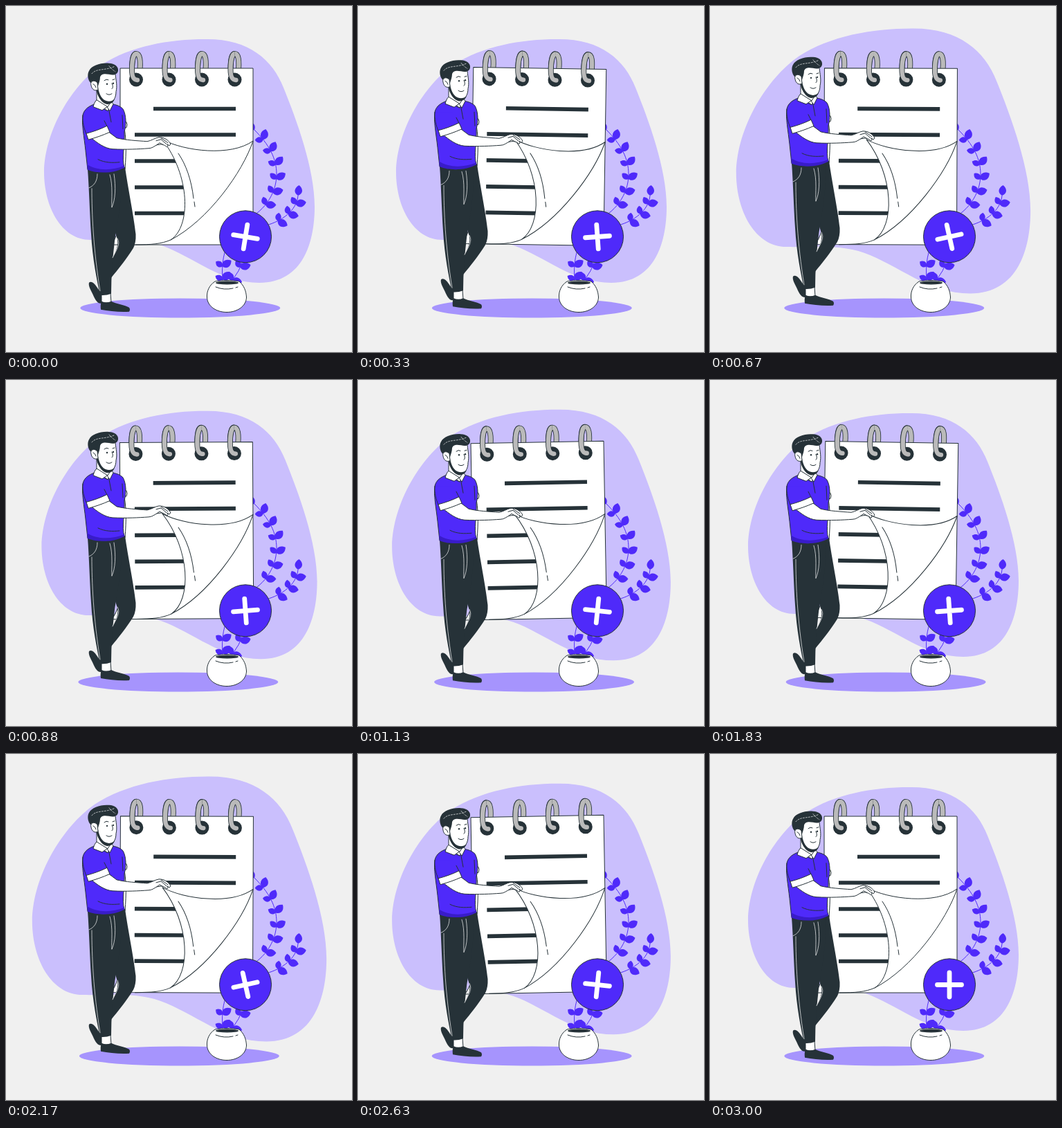
An HTML page for the animation above (3040 ms loop, 500 px wide and 500 px high).

```html
<!DOCTYPE html>
<html>
<head>
<meta charset="utf-8">
<style>
html, body { margin: 0; height: 100%; overflow: hidden; background: #f0f0f0; }
svg { display: block; width: 100vw; height: 100vh; }
.line { fill: none; stroke: #263238; stroke-linecap: round; stroke-linejoin: round; }
.paper { fill: #fff; stroke: #263238; stroke-linejoin: round; }
.dark { fill: #263238; }
.main { fill: #4f2afa; }
.outlined { stroke: #263238; stroke-linejoin: round; }
.stem { fill: none; stroke: #4f2afa; }
.seam { fill: none; stroke: #fff; stroke-width: .8; stroke-linecap: round; opacity: .85; }
.ring { fill: none; stroke: #263238; stroke-width: 8; }
.ring.metal { stroke: #bababa; stroke-width: 6.3; }
</style>
</head>
<body>
<svg viewBox="0 0 500 500">
  <path id="blob" fill="#cabffd" d="M288 48 C350 47 385 77 401 118 C420 165 446 235 446 290 C446 340 430 400 366 400 C310 400 270 362 225 346 C190 334 150 339 122 338 C80 338 55 290 55 240 C56 180 95 115 138 85 C180 58 235 48 288 48Z"/>
  <ellipse id="shadow" cx="251.800" cy="436.500" rx="144.500" ry="14" fill="#a694fd"/>
  <g id="plant"></g>

  <g id="pad">
    <g id="backRings"></g>
    <path class="paper" d="M165 90 H357 V345 H152 C160 335 165 318 165 298Z"/>
    <path class="line" stroke-width="5.700" style="stroke-linecap: butt" d="M213 148.500 H332 M186 186 H332 M186 224 H250 M186 262 H262 M186 299.500 H264"/>
    <path class="paper" d="M226 193 C258 210 325 218 357 195 C342 240 292 310 238 338 C268 318 266 245 226 193Z"/>
    <path class="line" d="M187 345 C210 345 224 344 238 338 M249 213 C260 229 268 251 271 278 M272 283 L273 290"/>
    <g id="frontRings"></g>
  </g>

  <g id="man">
    <!-- far arm -->
    <path class="paper" d="M170 172 C174 190 174 210 172 236 L167 236 V172Z"/>
    <path class="paper" d="M168 168 L174 168 Q176 172 174 176 L168 177Z"/>
    <!-- far leg -->
    <path class="dark" d="M120 400 C123 397 128 401 131 406 L138 416 L138 430 C131 431 128 422 124 414 C121 408 119 404 120 400Z"/>
    <path class="dark" d="M150 236 L172 233 C176 262 185 305 187.500 330 Q188 342 184 350 C174 366 162 381 152 393 L148 376 C156 360 163 350 161 338 L150 300Z"/>
    <!-- near leg -->
    <path class="paper" d="M138 415 L151 415 L152 429 L138 430Z"/>
    <path class="dark" d="M118 236 L168 234 C168 280 160 320 157 340 C154 365 152 390 152 416 Q144 419 136 418 C131 395 125 365 123 330 C121 300 120 262 118 236Z"/>
    <path class="dark" d="M138 427 Q145 430 152 427 C159 431 172 432 178 436 Q180 439 178 442 C164 443 149 441 137 439 Q136 432 138 427Z"/>
    <path class="seam" d="M132 243 C132 254 127 260 120 263 M124 264 C124 300 126 350 136 412 M150 244 C155 260 152 280 153 291 M156 243 C159 262 158 281 153 291 M161 336 C166 344 160 352 154 364"/>
    <!-- neck and shirt -->
    <path class="paper" d="M131 118 L131 141 L147 152 L153 140 L150 128Z"/>
    <path class="main outlined" d="M128 142 C120 145 113 149 111 158 C109 170 113 190 115 209 L118 237 C134 243 156 242 171 234 C167 220 172 200 171 182 C174 172 174 158 169 149 C164 144 158 143 154 142 L147 152Z"/>
    <path d="M117 229 C130 238 152 239 171 231 L171 234 C156 242 134 243 118 237Z" fill="#391cc9"/>
    <path class="line" d="M133 222 C143 227 154 227 164 226 M149 152 L152 168 M168 158 L169 178"/>
    <path class="paper" d="M131 136 C128 139 127 142 126 146 L139 151 L146 146 L150 152 L155 142 L152 138 L147 146Z"/>
    <!-- head -->
    <path class="paper" d="M132 100 C142 96 154 94 158 99 C159 108 161 116 159 124 C159 133 155 140 147 141 C138 140 133 131 131 122Z"/>
    <path class="dark" d="M132 113 C134 126 137 134 144 137 C149 139 153 138 157 135 C155 140 150 143 145 142 C138 140 133 132 131 122Z"/>
    <path class="dark" d="M123 112 C118 108 117 99 120 94 C124 86 137 82 149 83 C157 83 163 88 162 94 C161 99 156 101 149 99 C142 98 138 98 136 103 C136 108 134 112 133 116Z"/>
    <path class="paper" d="M132 111 C127 106 121 109 123 115 C124 121 129 124 133 121Z"/>
    <path class="seam" stroke-dasharray="2 2" d="M124 98 C131 90 142 94 156 88 M149 87 Q154 93 158 95"/>
    <path class="line" d="M126 113 Q129 114 130 118 M142 108 Q145 105 148 107 M154 107 L157 106 M153 112 Q156 118 153 120 M145 127 Q149 130 153 127"/>
    <circle class="dark" cx="146" cy="113" r="1.200"/>
    <circle class="dark" cx="155" cy="112" r="1.200"/>
    <!-- near arm -->
    <path class="paper" d="M122 190 C132 198 142 206 154 207 C174 208 192 207 206 206 C211 206 214 203 218 201 L225 200 C229 201 231 203 233 204 Q235 203 233 200 L236 202 Q239 201 237 198 C233 193 228 190 221 190 C215 191 210 195 204 196 C190 195 172 194 160 191 L148 182Z"/>
    <path class="line" d="M217 195 L224 193 L232 200 M224 191 L234 198 M218 201 L222 198 L227 201"/>
    <path class="main" d="M112 158 C110 168 113 178 116 185 L146 174 C143 168 139 162 137 158"/>
    <path class="line" d="M111 158 C110 168 113 178 116 185 M146 174 L142 166"/>
    <path class="paper" d="M116 184.500 C126 182 137 178 146 173.500 L150 182.500 C140 187 130 190.500 119 193.500Z"/>
  </g>

  <circle class="main outlined" cx="346" cy="333.300" r="37.500"/>
  <path id="plus" d="M328.500 333.500 H363.500 M346 316 V351" stroke="#fff" stroke-width="6.800" stroke-linecap="round"/>

  <path class="paper" d="M302 398 C293 404 290 413 290.500 421 C291 434 304 442.500 319 442.500 C334 442.500 347 434 347.500 421 C347 412 344 404 337 398 C326 396 312 396 302 398Z"/>
  <ellipse class="dark" cx="319.500" cy="400" rx="16.500" ry="2.500"/>
  <path class="line" d="M303 406 Q315 411 328 408 M332 407 L335 406"/>
</svg>
<script>
const $ = id => document.getElementById(id);
const place = (id, value) => $(id).setAttribute('transform', value);

function add(id, markup) {
  $(id).insertAdjacentHTML('beforeend', markup);
  return $(id).lastElementChild;
}

function leaf(x, y, turn, size) {
  add('plant', `<path class="main" d="M0 0C.2 -.47 .7 -.47 1 0C.7 .47 .2 .47 0 0Z"
    transform="translate(${x} ${y}) rotate(${turn}) scale(${size})"/>`);
}

// A stem with a leaf at its tip and pairs of leaves every `gap` below it
function branch(d, skip, gap, pairs) {
  const stem = add('plant', `<path class="stem" d="${d}"/>`);
  const length = stem.getTotalLength();
  const node = at => {
    const a = stem.getPointAtLength(at - 1), b = stem.getPointAtLength(at);
    return [b.x, b.y, Math.atan2(b.y - a.y, b.x - a.x) * 180 / Math.PI];
  };
  leaf(...node(length), 15);
  for (let i = 0; i < pairs; i++) {
    const [x, y, turn] = node(length - skip - i * gap);
    leaf(x, y, turn + 52, 15.5);
    leaf(x, y, turn - 55, 12);
  }
}

branch('M340 312 C372 300 391 272 391 243 C391 220 380 200 359 179', 19, 20.5, 6);
branch('M376 317 C398 311 420 296 422 274', 13, 18, 3);
branch('M314 400 C311 385 312 360 322 340', 38, 19, 2);
branch('M322 400 Q338 388 346 355', 24, 23, 2);

function ring(id, d) {
  add(id, `<path class="ring" d="${d}"/>`);
  add(id, `<path class="ring metal" d="${d}"/>`);
}

for (let i = 0; i < 4; i++) {
  const x = 188 + i * 47.5;
  ring('backRings', `M${x + 5} 97 Q${x + 8} 69 ${x} 69 Q${x - 6} 69 ${x - 6} 92`);
  add('frontRings', `<circle class="dark" cx="${x}" cy="106.5" r="10"/>`);
  ring('frontRings', `M${x} 69 C${x - 4} 69 ${x - 6} 80 ${x - 6} 92 C${x - 6} 102 ${x - 4} 107 ${x + 2} 107`);
  add('frontRings', `<circle fill="#bababa" cx="${x + 2}" cy="107" r="3.150"/>`);
}

// cubic-bezier(.25, .1, .25, 1)
function ease(x) {
  let lo = 0, hi = 1, s;
  for (let i = 0; i < 20; i++) {
    s = (lo + hi) / 2;
    if (.75 * s * (1 - s) + s ** 3 < x) lo = s; else hi = s;
  }
  return .3 * s * (1 - s) ** 2 + 3 * s * s * (1 - s) + s ** 3;
}

const phase = (t, length) => (t / length % 1 + 1) % 1;
const peak = (p, from, top, to) =>
  Math.max(0, Math.min((p - from) / (top - from), (to - p) / (to - top)));

// Each takes a phase from 0 to 1
const float = p => peak(p, 0, .5, 1);
const sway = p => peak(p, 0, .25, .5) - peak(p, .5, .75, 1);
const beat = p => peak(p, 0, .1, .3) + peak(p, .4, .5, .6);

// Ten eased moves that grow toward the middle and shrink again
function shake(p) {
  const reach = [0, -.75, 1.5, -3, 3, -3];
  const at = i => reach[Math.min(i, 10 - i)];
  const i = Math.floor(p * 10);
  return at(i) + (at(i + 1) - at(i)) * ease(p * 10 - i);
}

function draw(ms) {
  const step = Math.floor((ms % 3040 + 4) * .024);  // 24 steps a second
  const time = step / 24, t = time + .02;
  const scale = 1 + .1 * beat(phase(t - .5, 1.5));
  const turn = step < 72 ? 15 * sway(phase(t + .5, 1.5)) : 0;
  place('blob', `translate(250.5 224) scale(${scale}) translate(-250.5 -224)`);
  place('shadow', `translate(${shake(phase(time, 3))} 0)`);
  place('pad', `rotate(${sway(phase(time, 1.5))} 261 205)`);
  place('man', `translate(0 ${-10 * float(phase(t, 1.5))})`);
  place('plus', `rotate(${turn} 346 333.5)`);
}

const start = performance.now();
function tick() {
  draw(performance.now() - start);
  requestAnimationFrame(tick);
}
tick();
</script>
</body>
</html>
```
